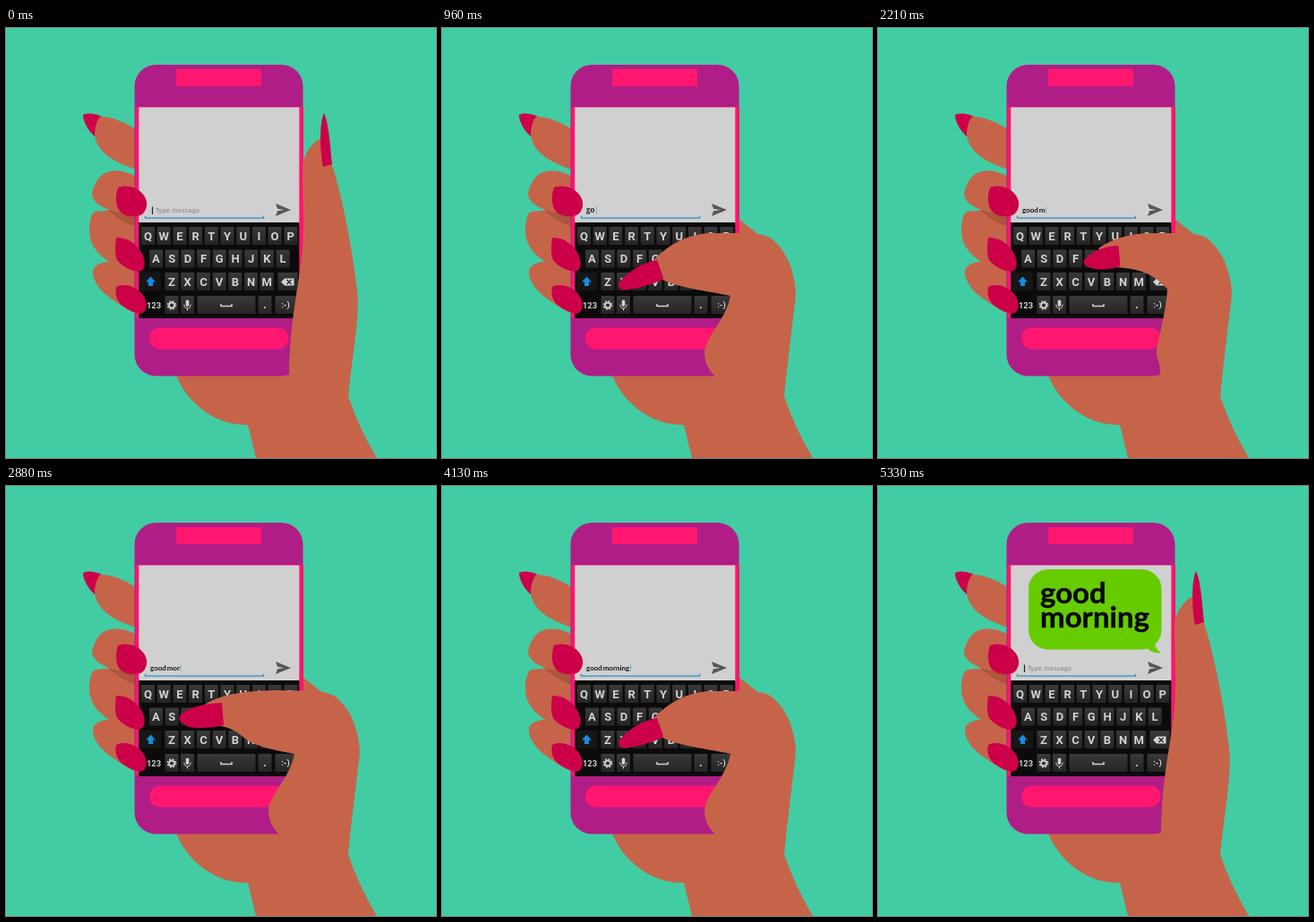
An HTML page for the animation above (5370 ms loop, 480 by 480 pixels).

```html
<!DOCTYPE html>
<html lang="en">
<head>
<meta charset="utf-8">
<title>Typing a greeting</title>
<style>
  html, body { margin: 0; width: 100%; height: 100%; overflow: hidden; background: #42cca4; }
  svg { display: block; width: 100%; height: 100%; }
  .skin { fill: #c6644a; }
  .nail { fill: #cc0048; }
  .pink { fill: #ff166e; }
  .purple { fill: #b01d86; }
  .pose, #bubble, #hint, #typed { visibility: hidden; }
  .on { visibility: visible !important; }
  #keys text { font: 600 13px Roboto, sans-serif; fill: #d2d2d2; text-anchor: middle; }
  #keys .small { font-size: 9.3px; }
  #hint text { font: 6.9px "DejaVu Sans", sans-serif; fill: #808080; }
  #typed { font: 700 8px Lato, sans-serif; fill: #161616; white-space: pre; word-spacing: -1.2px; }
  #typed.serif { font-family: "Noto Serif", serif; }
  #caret { fill: #2488c4; font-weight: 400; }
  #bubble text { font: 700 33px Lato, sans-serif; fill: #050505; stroke: #050505; stroke-width: .4; }
</style>
</head>
<body>
<svg viewBox="0 0 480 480">
  <defs>
    <linearGradient id="cap" x2="0" y2="1">
      <stop stop-color="#393939"/>
      <stop offset="1" stop-color="#252525"/>
    </linearGradient>
  </defs>
  <rect width="480" height="480" fill="#42cca4"/>

  <!-- palm and fingers behind the phone -->
  <path class="nail" d="M86 97C92 94 101 96 107 99L102 118L99 121C91 114 86 104 86 97Z"/>
  <g class="skin">
    <path d="M190 388C205 424 239 444 270 443L279 480H414Q394 447 382 411L330 370H190Z"/>
    <path d="M105 99C118 99 133 105 146 114V158C122 151 101 139 99 119C99 111 101 104 105 99Z"/>
    <path d="M112 261C101 263 96 267 97 275C99 286 108 296 120 304C130 311 138 316 146 319V262Z"/>
    <path d="M118 204C108 204 99 204 97 207C93 213 92 225 94 235C97 247 108 258 122 265L146 273V215Z"/>
    <path fill="#ad553d" d="M112 200L146 204V222C135 219 125 213 117 206Z"/>
    <path d="M146 167C135 158 115 157 106 165C99 172 96 182 96 186C98 196 108 201 121 205L146 208Z"/>
  </g>
  <path class="skin pose A B C" d="M331 213L355 232L331 245Z"/>

  <!-- phone -->
  <rect class="purple" x="143.500" y="41" width="188" height="347.5" rx="24"/>
  <rect class="pink" x="190" y="46" width="95" height="19"/>
  <rect class="pink" x="144.500" y="88" width="187.5" height="236"/>
  <rect class="pink" x="160" y="334.5" width="155.500" height="24" rx="12"/>
  <rect x="148.300" y="88.500" width="179" height="130" fill="#d0d0d0"/>
  <rect x="148.300" y="217" width="179" height="107" fill="#0b0b0b"/>
  <g id="keys"></g>

  <path d="M155.500 209.700V212.200H287.500V209.700" fill="none" stroke="#2b8fc8" stroke-width="1.300"/>
  <path d="M301 196L318 203L301 210L303 204.300L311 203L303 201.700Z" fill="#565656"/>
  <g id="hint">
    <path d="M163.500 199.500V208" stroke="#222" stroke-width="1.200"/>
    <text x="167" y="206.300">Type message</text>
  </g>
  <text id="typed" x="161" y="206"><tspan id="word"></tspan><tspan id="caret">|</tspan></text>

  <g id="bubble">
    <g fill="#66cc00">
      <rect x="168" y="93" width="148.500" height="89.500" rx="22"/>
      <path d="M300 181C304 185 310 187 316 186.300C311 183 308.500 178 309 173Z"/>
    </g>
    <text x="181" y="130.500">good</text>
    <text x="181" y="157.500">morning</text>
  </g>

  <!-- fingernails over the phone edge -->
  <g class="nail">
    <path d="M125 178C135 174 148 178 154 187C159 194 158 203 152 208C145 212 131 211 126 203C122 197 122 187 125 178Z"/>
    <path d="M123 234C135 233 148 242 153 254C156 262 155 269 151 271C143 274 129 266 124 259C121 252 122 242 123 234Z"/>
    <path d="M123 289C132 284 147 289 153 298C158 305 158 315 153 318C147 321 130 312 126 306C122 300 122 294 123 289Z"/>
  </g>

  <!-- thumb poses -->
  <g class="pose rest">
    <path class="skin" d="M353 122C343 127 335 136 331 152C331 180 333 215 331.500 240C329 280 316 325 316 390L330 430L382 411C386 370 394 330 392.500 298C389 262 378 196 363 150Z"/>
    <path class="nail" d="M355 95C350 105 350 135 354 155L364 152C362 130 360 105 355 95Z"/>
  </g>
  <g id="thumbs"></g>
</svg>

<script>
const $ = id => document.getElementById(id);

// keyboard
const cap = (x, y, w = 15) =>
  `<rect x="${x - w / 2}" y="${y - 10}" width="${w}" height="20" rx="1" fill="url(#cap)"/>`;
const label = (s, x, y, cls = "") => `<text class="${cls}" x="${x}" y="${y}">${s}</text>`;
const row = (letters, x, y) => [...letters].map((c, i) => {
  const cx = x + i * 17.7;
  return cap(cx, y) + label(c, cx, y + 4.7);
}).join("");

$("keys").innerHTML =
  row("QWERTYUIOP", 158.5, 232) + row("ASDFGHJKL", 167.5, 257.5) + row("ZXCVBNM", 185, 283) +
  cap(162, 283, 22).replace("url(#cap)", "#161616") + cap(314.5, 283, 22) +
  cap(185, 309) + cap(202.5, 309) + cap(246, 309, 65) + cap(289, 309) + cap(312, 309, 23) +
  label("123", 165, 312.5, "small") + label(".", 289, 313) + label(":-)", 312, 312, "small") +
  `<path d="M161.500 277.500L167 283.500H164V288H159V283.500H156Z" fill="#168be0"/>
   <path d="M307 283.500L311 279.500H321.500V287.500H311Z" fill="#d2d2d2"/>
   <path d="M313.500 281L318.500 286M318.500 281L313.500 286" stroke="#222" stroke-width="1.300"/>
   <g fill="none" stroke="#d2d2d2">
     <circle cx="185" cy="309.500" r="4.400" stroke-width="1.700" stroke-dasharray="2 1.455"/>
     <circle cx="185" cy="309.500" r="2.900" stroke-width="1.600"/>
     <path d="M198.800 308.500C198.800 314.500 206.200 314.500 206.200 308.500M202.500 313V315.500"/>
     <path d="M240 308V310.500H252V308" stroke-width="1.500"/>
   </g>
   <rect x="200.700" y="303.500" width="3.600" height="7.500" rx="1.800" fill="#d2d2d2"/>`;

// bent thumbs share the knuckle and wrist
const knuckle = "L345 229C356 230 364 232 369 236C378 244 386 256 389 266C393 279 396 290 394.500 302C390 340 385 380 382 411L330 430";
const wide = "L305 389C296 380 293 372 293 361C296 343 317 325 322 299";
const thumbs = {
  A: {
    skin: `M234 262C252 241 275 230 300 229${knuckle}${wide}C290 292 267 291 244 280Z`,
    nail: "M198 284C204 275 222 262 240 259L247.500 280C235 286 215 292 203 292.500C197 291 196 287 198 284Z"
  },
  B: {
    skin: `M246 246C258 237 278 230 300 229${knuckle}L314 389C318 376 309 368 311 359C314 341 322 315 323 291C307 274 292 269 267 267Z`,
    nail: "M230 259C238 250 252 243 268.500 243L270.500 266C258 270 242 271 233 266C229 263 229 261 230 259Z"
  },
  C: {
    skin: `M220 245C240 232 265 229 300 228${knuckle}${wide}C296 294 276 291 262 278C256 273 250 270 240 268Z`,
    nail: "M194 257C200 248 220 243 241 242L243 267C230 270 208 272 200 267C195 264 192 261 194 257Z"
  }
};
$("thumbs").innerHTML = Object.entries(thumbs).map(([name, t]) =>
  `<g class="pose ${name}"><path class="skin" d="${t.skin}"/><path class="nail" d="${t.nail}"/></g>`).join("");

// typing
const LOOP = 5370, FIRST_KEY = 500, KEY_STEP = 300, SEND = 4240;
const message = "good morning";
const presses = "BABCABACBCBA";
const poses = document.querySelectorAll(".pose");
const show = (el, on) => el.classList.toggle("on", on);

function draw(t) {
  const sent = t >= SEND;
  const typed = sent || t < FIRST_KEY ? 0
    : Math.min(message.length, Math.floor((t - FIRST_KEY) / KEY_STEP) + 1);
  const pose = typed ? presses[typed - 1] : "rest";
  poses.forEach(p => show(p, p.classList.contains(pose)));
  $("word").textContent = message.slice(0, typed);
  $("typed").classList.toggle("serif", typed < 3);
  show($("typed"), typed > 0);
  show($("hint"), typed === 0);
  show($("bubble"), sent);
}

const start = performance.now();
function tick() {
  draw((performance.now() - start) % LOOP);
  requestAnimationFrame(tick);
}
tick();
</script>
</body>
</html>
```
